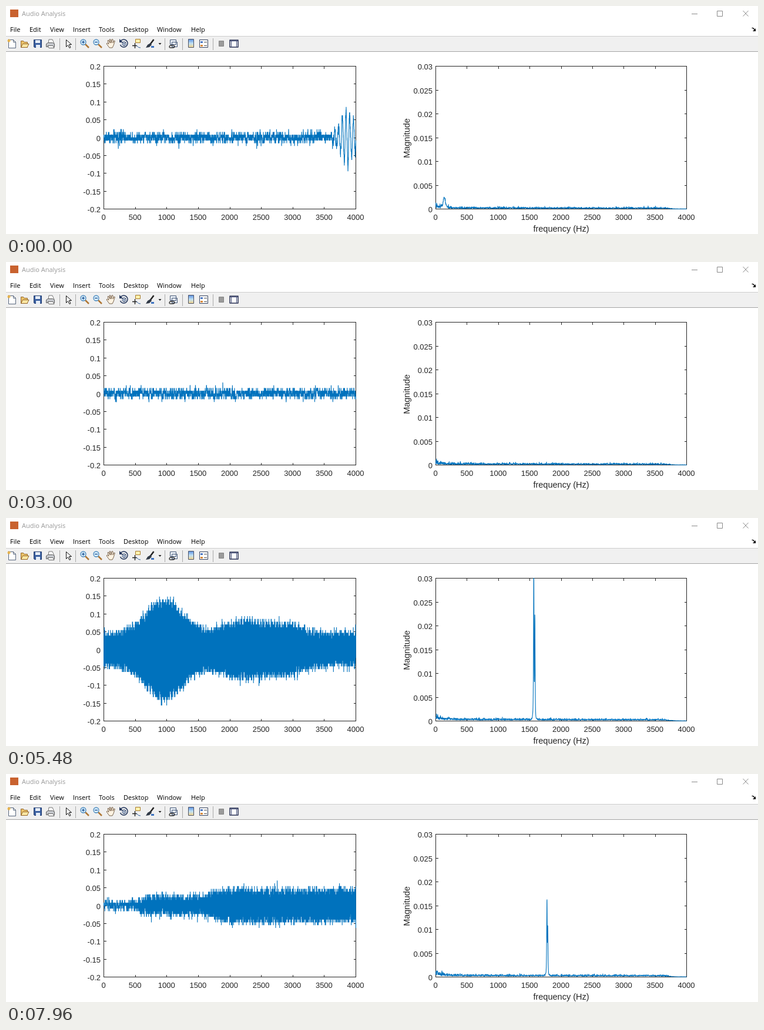
These frames come from a looping animation (1280x388 px, 8 s). An HTML page:

```html
<!DOCTYPE html>
<html lang="en">
<head>
<meta charset="utf-8">
<title>Audio Analysis</title>
<style>
  html, body { margin: 0; width: 100%; height: 100%; overflow: hidden; background: #fff; }
  svg { display: block; }
  .ui { font: 11px "Open Sans", "Noto Sans", sans-serif; }
  .tick { font: 13px "Liberation Sans", Arial, sans-serif; fill: #262626; }
  .label { font: 14.5px "Liberation Sans", Arial, sans-serif; fill: #262626; text-anchor: middle; }
  .trace { fill: none; stroke: #0072bd; stroke-width: 1.1; stroke-linejoin: bevel; }
  .axis { fill: none; stroke: #262626; shape-rendering: crispEdges; }
</style>
</head>
<body>
<svg width="1280" height="388" viewBox="0 0 1280 388">
  <defs>
    <clipPath id="clip"><path d="M165 102H1160V347H165z"/></clipPath>
    <linearGradient id="bar" x2="0" y2="1">
      <stop stop-color="#5b8fe0"/><stop offset=".5" stop-color="#bfe0f4"/><stop offset="1" stop-color="#f6d58a"/>
    </linearGradient>
  </defs>

  <!-- title bar -->
  <rect x="7" y="6" width="14" height="13" fill="#c9622f"/>
  <text class="ui" x="27" y="17" fill="#999">Audio Analysis</text>
  <path d="M1167 13.500h10M1210.500 8.500h9v9h-9zM1254.500 8l9 9.500m0-9.500l-9 9.500" fill="none" stroke="#8a8a8a"/>
  <path d="M1269.500 37.500q3-.5 4.500 3" fill="none" stroke="#000" stroke-width="1.200"/>
  <path d="M1276 38v5h-5z"/>
  <g id="menu" class="ui"></g>

  <!-- toolbar -->
  <path d="M0 52h1280v25H0z" fill="#f0f0f0"/>
  <path d="M0 51.500h1280" stroke="#cdcdcd"/>
  <path d="M0 77.500h1280" stroke="#a5a5a5"/>
  <path d="M91.500 55v20M118.500 55v20M270.500 55v20M300.500 55v20M352.500 55v20" stroke="#a8a8a8"/>
  <g stroke-linejoin="round">
    <path d="M4.500 57.500h8l4 4v10h-12z" fill="#fff" stroke="#56657c"/>
    <path d="M12.500 57.500v4h4" fill="none" stroke="#56657c"/>
    <path d="M5 56v6M2 59h6M3 57l4 4m0-4l-4 4" stroke="#eeae2d"/>
    <path d="M25.500 70.500v-11h4l1.500 2h5.500v9z" fill="#e9c168" stroke="#94672d"/>
    <path d="M25.500 70.500l3-6h10.500l-3 6z" fill="#fbe6a2" stroke="#94672d"/>
    <path d="M47.500 57.500h13v13h-12l-1-1z" fill="#3a5f9f" stroke="#263f72"/>
    <path d="M50 58h8v5h-8zM51 66h7v5h-7z" fill="#e5edf7"/>
    <path d="M72 64l1-7h6l3 7z" fill="#fff" stroke="#777"/>
    <path d="M68.500 64.500l3-2h8l3 2v5h-14z" fill="#c5c8cd" stroke="#606060"/>
    <path d="M71 67.500h9l2 4h-9z" fill="#f7f7f7" stroke="#666"/>
    <path d="M102.500 57.500v12l3-3 2.500 5 2-1-2.500-5h4z" fill="#fff" stroke="#111"/>
    <g id="zoom">
      <path d="M135 65l6 6" stroke="#b07835" stroke-width="2.500"/>
      <circle cx="131.500" cy="61.500" r="4.500" fill="#d9effc" stroke="#4a88bd" stroke-width="1.300"/>
      <path d="M129 61.500h5" stroke="#174d91" stroke-width="1.300"/>
    </g>
    <use href="#zoom" x="22"/>
    <path d="M131.500 59v5" stroke="#174d91" stroke-width="1.300"/>
    <path d="M176 71l-5-7q1-2 3 0l1 1-2-6q1-2 2 0l2 4-1-6q1-1 2 0l1 6 1-6q1-1 2 0v6l2-4q2 0 1 2l-2 6-2 4z" fill="#fff3e2" stroke="#6b553e" stroke-width=".9"/>
    <path d="M195 60a6.500 6.500 0 1 1-.5 6" fill="none" stroke="#26395f" stroke-width="1.600"/>
    <path d="M193 56v6h6z" fill="#26395f"/>
    <path d="M198 62l3-1.500 3 1.500v4l-3 2-3-2zl3 1.500 3-1.500m-3 1.500v4.500" fill="#d3e0f2" stroke="#35496d" stroke-width=".9"/>
    <path d="M220.500 56.500h8v6h-8z" fill="#fff1ad" stroke="#a57a2c"/>
    <path d="M215 67.500h8M219.500 63v9" stroke="#222" stroke-width="1.400"/>
    <path d="M222 67q4 5 7 4" fill="none" stroke="#315f9c"/>
    <path d="M251.500 57l-6 8" stroke="#222" stroke-width="2.500"/>
    <path d="M246 63l2 3-4 4-6 1 3-5z" fill="#303946"/>
    <path d="M247 68h5v3h-5z" fill="#3e73c0"/>
    <path d="M259.500 63h5l-2.500 3z" fill="#222"/>
    <path d="M279.500 57.500h10v8h-10zM282.500 61.500h9v8h-9z" fill="#e9eff8" stroke="#445775"/>
    <path d="M278 70q0-3 3-3h3q3 0 3 2t-3 2h-4q-2 0-2-1z" fill="none" stroke="#333" stroke-width="1.300"/>
    <path d="M310.500 56.500h9v14h-9z" fill="url(#bar)" stroke="#4b5264"/>
    <path d="M329.500 57.500h14v13h-14z" fill="#fff" stroke="#39455f"/>
    <path d="M331 60h4v3h-4z" fill="#4c78c4"/>
    <path d="M331 66h4v3h-4z" fill="#d88b3e"/>
    <path d="M337 61.500h5M337 67.500h5" stroke="#555"/>
    <path d="M362.500 59.500h8v9h-8z" fill="#9a9a9a" stroke="#858585"/>
    <path d="M381 58h14v12h-14z" fill="#fff" stroke="#2b3355" stroke-width="1.500"/>
    <path d="M381 59.500h14M383.500 60v10M392.500 60v10" stroke="#3b4672"/>
  </g>

  <g id="axes"></g>
  <text class="label" x="945" y="384">frequency (Hz)</text>
  <text class="label" transform="translate(687 225) rotate(-90)">Magnitude</text>
  <g class="trace" clip-path="url(#clip)"><path id="wave"/><path id="spectrum"/></g>
</svg>

<script>
const $ = id => document.getElementById(id);
const LOOP = 8000, RATE = 8000, SPAN = 4000, STEP = 1 / 128;
const TIMES = [0, 520, 1010, 1510, 2020, 2500, 3000, 3510, 3990,
  4500, 4980, 5480, 5980, 6490, 6980, 7480, 7960];

const MENU = { File: 7, Edit: 40, View: 75, Insert: 114, Tools: 158, Desktop: 200, Window: 257, Help: 315 };
$('menu').innerHTML = Object.entries(MENU)
  .map(([name, x]) => `<text x="${x}" y="44">${name}</text>`).join('');

// A plot maps 0..SPAN and low..high onto its box.
function plot(left, right, low, high, step) {
  const top = 102.5, bottom = 345.5;
  const px = x => left + (right - left) * x / SPAN;
  const py = y => bottom - (bottom - top) * (y - low) / (high - low);
  const path = points => 'M' + points.map(([x, y]) => px(x).toFixed(2) + ' ' + py(y).toFixed(1)).join('L');
  let d = `M${left} ${top}H${right}V${bottom}H${left}z`, text = '';
  for (let x = 0; x <= SPAN; x += 500) {
    d += `M${px(x)} ${top}v4M${px(x)} ${bottom}v-4`;
    text += `<text class="tick" x="${px(x) - .5}" y="364" text-anchor="middle">${x}</text>`;
  }
  for (let y = low; y < high + step / 2; y += step) {
    d += `M${left} ${py(y)}h4M${right} ${py(y)}h-4`;
    text += `<text class="tick" x="${left - 5.5}" y="${py(y) + 5.5}" text-anchor="end">${+y.toFixed(3) || 0}</text>`;
  }
  $('axes').innerHTML += `<path class="axis" d="${d}"/>${text}`;
  return path;
}
const wavePlot = plot(166.5, 595.5, -.2, .2, .05);
const spectrumPlot = plot(731.5, 1158.5, 0, .03, .005);

function randomFrom(seed) {
  return () => {
    seed = seed + 0x6D2B79F5 | 0;
    let t = Math.imul(seed ^ seed >>> 15, seed | 1);
    t ^= t + Math.imul(t ^ t >>> 7, t | 61);
    return ((t ^ t >>> 14) >>> 0) / 4294967296;
  };
}
const rayleigh = rnd => Math.sqrt(-Math.log(1 - rnd()));

// The recording as loudness over time k, counted in half-second views.
const bump = (k, center, height, width) => height * Math.exp(-(((k - center) / width) ** 2));
const ramp = (k, from, to) => {
  const p = Math.min(1, Math.max(0, (k - from) / (to - from)));
  return p * p * (3 - 2 * p);
};
const voice = k => bump(k, .965, .07, .04) + bump(k, 1.1, .062, .07);
const SWELLS = [[8.7, .04, .15], [9.42, .06, .18], [9.8, .12, .3], [11.24, .1, .1], [11.56, .037, .12],
  [11.73, .022, .08], [13.1, .045, .05], [13.2, .025, .3], [13.55, .034, .15], [13.78, .025, .08]];
const whistle = k =>
  .046 * (ramp(k, 8.1, 8.5) - ramp(k, 13.7, 14.9)) +
  .023 * ramp(k, 16.1, 16.18) + .021 * ramp(k, 16.36, 16.5) +
  SWELLS.reduce((sum, swell) => sum + bump(k, ...swell), 0);
const pitch = k => 1497 + 6 * k + 180 * ramp(k, 11.2, 12.2);
const VOICE_PITCH = 135.6;

function wavePath(rnd, n) {
  const points = [];
  const tone = (f, i) => Math.cos(2 * Math.PI * f * (i - 3785) / RATE);
  let noise = 0;
  for (let i = 0; i <= SPAN; i++) {
    const k = n + i / SPAN;
    const gauss = 1.414 * rayleigh(rnd) * Math.cos(2 * Math.PI * rnd());
    noise = .6 * noise + .006 * gauss;
    const v = voice(k) * tone(VOICE_PITCH, i) + whistle(k) * tone(pitch(n), i) + noise;
    points.push([i, Math.round(v / STEP) * STEP]);
  }
  return wavePlot(points);
}

function mean(loudness, n) {
  let sum = 0;
  for (let i = 0; i < 100; i++) sum += loudness(n + i / 100);
  return sum / 100;
}

// A whistle that wavers within the view shows as two close peaks.
function spectrumPath(rnd, n) {
  const points = [], loud = mean(whistle, n), hum = mean(voice, n);
  const waver = Math.cos(Math.PI + (n - 13) * 4 / 3), size = Math.abs(waver);
  const main = loud * (.7 - .3 * size), side = main * (.4 + .3 * size);
  const peak = (f, center, height, width) => height / (1 + ((f - center) / width) ** 2) ** 1.5;
  for (let f = 0; f <= SPAN; f += 2) {
    const fade = 1 - .85 * ramp(f, 3600, 3850);
    const floor = (.0002 + .0001 * Math.exp(-f / 900) + .0004 * Math.exp(-f / 70)) * fade;
    const low = loud > .005 ? .45 : 0;
    points.push([f, floor * (low + 1.1 * rayleigh(rnd)) +
      peak(f, VOICE_PITCH, hum / 2, 24) +
      peak(f, pitch(n), main, 6) + peak(f, pitch(n) + 20 * waver, side, 5)]);
  }
  return spectrumPlot(points);
}

const views = TIMES.map((start, n) => {
  const rnd = randomFrom(n + 17);
  return { start, wave: wavePath(rnd, n), spectrum: spectrumPath(rnd, n) };
});

let shown;
function draw() {
  const t = performance.now() % LOOP;
  const now = views.findLast(v => v.start <= t);
  if (now !== shown) {
    shown = now;
    $('wave').setAttribute('d', now.wave);
    $('spectrum').setAttribute('d', now.spectrum);
  }
  requestAnimationFrame(draw);
}
draw();
</script>
</body>
</html>
```
